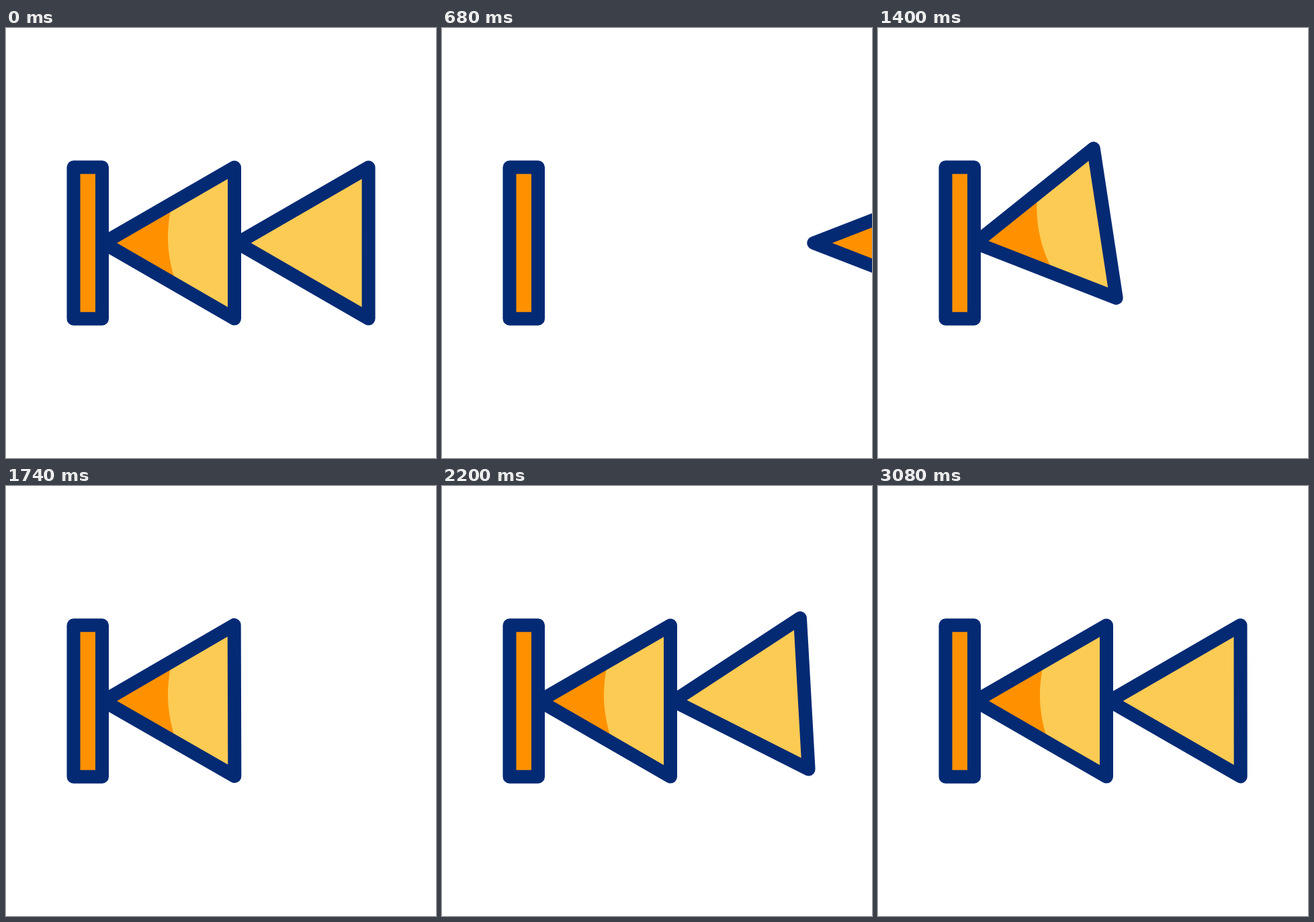
An HTML page with a canvas that plays this animation: 640x640 px, repeating every 3.6 s.

```html
<!DOCTYPE html>
<html lang="en">
<head>
<meta charset="utf-8">
<title>Rewind</title>
<style>
html, body { margin: 0; width: 100%; height: 100%; overflow: hidden; background: #fff; }
canvas { display: block; width: 100vmin; height: 100vmin; }
</style>
</head>
<body>
<canvas id="stage" width="640" height="640"></canvas>
<script>
const ctx = document.getElementById('stage').getContext('2d');
const LOOP = 3600;
const NAVY = '#042a74', ORANGE = '#ff9100', YELLOW = '#fccb54';
const WIDTH = 195, HALF = 112.6, MID = 320;

// Each triangle flies in, then swings about its tip
const FLY = 257, SWING = 196;
const ANGLES = [0, -16, 15, -10, 6.5, -4, 0];
const FIRST = { x: 145, start: 585, shaded: true };
const SECOND = { x: 344.6, start: 1661, shaded: false };

const clamp = v => Math.max(0, Math.min(1, v));
const ease = f => (1 - Math.cos(Math.PI * clamp(f))) / 2;

function swingAngle(ms) {
  const k = ms / SWING;
  if (k <= 0 || k >= ANGLES.length - 1) return 0;
  const i = Math.floor(k);
  return ANGLES[i] + (ANGLES[i + 1] - ANGLES[i]) * ease(k - i);
}

function trianglePath() {
  ctx.beginPath();
  ctx.moveTo(0, 0);
  ctx.lineTo(WIDTH, -HALF);
  ctx.lineTo(WIDTH, HALF);
  ctx.closePath();
}

function outline() {
  ctx.strokeStyle = NAVY;
  ctx.lineWidth = 20;
  ctx.lineJoin = 'round';
  ctx.stroke();
}

function drawTriangle(tri, x, angle, stretch) {
  ctx.save();
  ctx.translate(x, MID);
  ctx.rotate(angle * Math.PI / 180);
  ctx.scale(stretch, 1);
  trianglePath();
  ctx.fillStyle = tri.shaded ? ORANGE : YELLOW;
  ctx.fill();
  if (tri.shaded) {
    ctx.clip();
    ctx.beginPath();
    ctx.arc(296, -9, 200, 0, Math.PI * 2);
    ctx.fillStyle = YELLOW;
    ctx.fill();
  }
  trianglePath();
  ctx.restore();
  outline(); // stroke stays unstretched
}

function arrive(tri, t) {
  const ms = t - tri.start;
  if (ms <= 0) return;
  const f = clamp(ms / FLY);
  const x = tri.x + (651 - FIRST.x) * (1 - Math.pow(f, 1.67));
  const stretch = 1 + 0.53 * Math.sin(Math.PI * f);
  drawTriangle(tri, x, swingAngle(ms - FLY), stretch);
}

function drawBar() {
  ctx.beginPath();
  ctx.rect(100.5, 207.3, 42.5, 225.4);
  ctx.fillStyle = ORANGE;
  ctx.fill();
  outline();
}

function draw(t) {
  ctx.fillStyle = '#fff';
  ctx.fillRect(0, 0, 640, 640);
  if (t < 510) {
    drawTriangle(SECOND, SECOND.x, 0, 1);
    drawTriangle(FIRST, FIRST.x, 0, 1);
    ctx.globalAlpha = ease(t / 510);
    ctx.fillStyle = '#fff';
    ctx.fillRect(0, 0, 640, 640);
    ctx.globalAlpha = 1;
  } else {
    arrive(SECOND, t);
    arrive(FIRST, t);
  }
  drawBar();
}

const begin = performance.now();
function tick() {
  draw((performance.now() - begin) % LOOP);
  requestAnimationFrame(tick);
}
tick();
</script>
</body>
</html>
```
